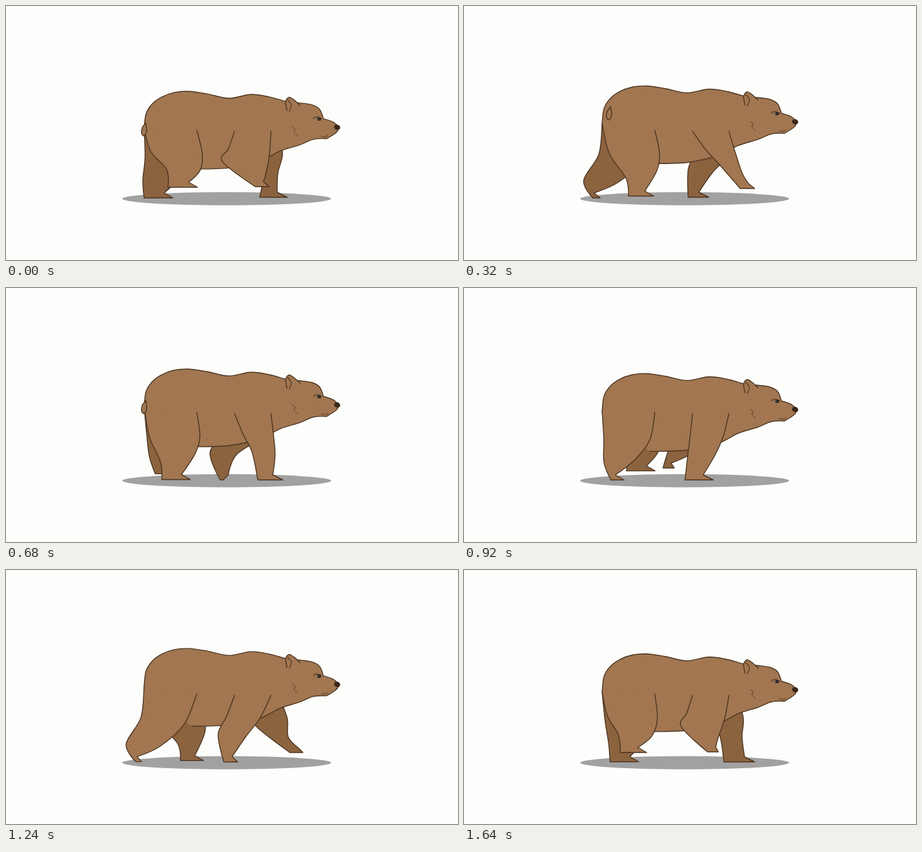
Animation, 720 px wide and 405 px high, one loop 1720 ms. Source, as an HTML page with a canvas:

```html
<!DOCTYPE html>
<html lang="en">
<head>
<meta charset="utf-8">
<title>Walking bear</title>
<style>
html, body { margin: 0; width: 100%; height: 100%; overflow: hidden; background: #fdfefc; }
canvas { display: block; width: 720px; height: 405px; }
</style>
</head>
<body>
<canvas id="stage" width="720" height="405"></canvas>
<script>
const ctx = document.getElementById('stage').getContext('2d');
const LOOP = 1720, STEP = 80, SHORT_STEP_END = 600, GROUND = 305;
const PAPER = '#fdfefc', SHADOW = '#a2a1a1', FUR = '#a17650', FAR_FUR = '#8b633f', INK = '#493320';

// Foot paths: time, heel x, foot y, visible foot length (fore legs: elbow x).
const HIND_STEP = [
  [0, 258, 289, 47], [320, 262, 303, 40], [400, 283, 304, 36], [540, 270, 305, 45], [860, 220, 306, 46],
  [920, 234, 306, 21], [1200, 203, 306, 11], [1400, 222, 304, 2], [1640, 249, 291, 42]
];
const FORE_STEP = [
  [0, 397, 288, 22, 345], [320, 440, 291, 23, 405], [480, 437, 304, 40, 405], [680, 401, 306, 40, 392],
  [920, 352, 306, 45, 357], [1240, 347, 306, 22, 338], [1400, 345, 304, 5, 338], [1640, 388, 290, 17, 346]
];
const FAR_FORE_STEP = [
  [0, 404, 305, 44, 410], [320, 357, 305, 33, 357], [680, 341, 306, 5, 325], [920, 317, 287, 18, 331],
  [1240, 452, 291, 21, 400], [1400, 456, 304, 33, 416], [1640, 414, 306, 49, 407]
];

// Torso outline at rest; the head is given as offsets from the nose.
const BACK = [[220,190], [223,166], [233,150], [248,139], [267,132], [290,130], [320,134], [355,141], [390,135], [420,139]];
const HEAD = [[-80,-41], [-60,-39], [-40,-36], [-28,-29], [-22,-14], [-4,-7], [1,5], [-17,18], [-38,19], [-60,28]];
const BELLY = [[437,225], [405,241], [355,252], [296,254]];
const NOSE = [527.5, 187.5];
const BROW = BACK.length + 4, CHIN = BACK.length + 7;
const TORSO = [...BACK, ...HEAD.map(([x, y]) => [x + NOSE[0], y + NOSE[1]]), ...BELLY];

const bob = time => 6.5 * Math.cos(4 * Math.PI * (time - 50) / LOOP);

function sample(keys, time) {
  const i = keys.findLastIndex(k => k[0] <= time);
  const a = keys[i], b = keys[(i + 1) % keys.length];
  const k = (time - a[0]) / ((b[0] - a[0] + LOOP) % LOOP);
  return a.slice(1).map((v, j) => v + (b[j + 1] - v) * k);
}

// Smooth curve through points; corners keep their sharp angle.
function curve(pts, corners = []) {
  const path = new Path2D();
  const slope = i => {
    if (corners.includes(i)) return [0, 0];
    const a = pts[Math.max(i - 1, 0)], b = pts[Math.min(i + 1, pts.length - 1)];
    return [(b[0] - a[0]) / 6, (b[1] - a[1]) / 6];
  };
  path.moveTo(...pts[0]);
  for (let i = 1; i < pts.length; i++) {
    const p = pts[i - 1], q = pts[i], u = slope(i - 1), v = slope(i);
    path.bezierCurveTo(p[0] + u[0], p[1] + u[1], q[0] - v[0], q[1] - v[1], ...q);
  }
  return path;
}

function shape(pts, fill, corners, width = 1.4) {
  const path = curve(pts, corners);
  if (fill) {
    ctx.fillStyle = fill;
    ctx.fill(path);
  }
  ctx.lineWidth = width;
  ctx.stroke(path);
}

function ellipse(x, y, rx, ry, color, angle = 0) {
  ctx.fillStyle = color;
  ctx.beginPath();
  ctx.ellipse(x, y, rx, ry, angle, 0, Math.PI * 2);
  ctx.fill();
}

// Legs run down the back edge, around the foot and up the front edge.
function drawHind(time, rise, fill) {
  const [heel, y, length] = sample(HIND_STEP, time);
  const toe = heel + length;
  const rump = [BACK[0][0], BACK[0][1] + rise];
  const hock = [heel - 2 - 17 * Math.max(0, 1 - length / 45), y - 28];
  const thigh = [(rump[0] + hock[0]) / 2 + (228 - hock[0]) / 4, (rump[1] + hock[1]) / 2 + 4];
  const knee = [0.72 * toe + 90, 268 - 0.22 * (toe - 275)];
  const flank = [304 + 0.45 * (knee[0] - 304) + 6, 200 + 0.57 * (knee[1] - 200)];
  const ankle = [Math.max(heel + 2, toe - 14), y - 8];
  shape([rump, thigh, hock, [heel, y], [toe, y], ankle, knee, flank, [304, 198]], fill, [3, 4, 5]);
}

function drawFore(keys, time, fill, shift = 0) {
  const [heel, y, length, elbowX] = sample(keys, time);
  const toe = heel + length;
  const shoulder = [364 + shift, 200];
  const elbow = [elbowX, 262 - 0.8 * Math.max(0, GROUND - y)];
  const upperArm = [(shoulder[0] + elbow[0]) / 2, (shoulder[1] + elbow[1]) / 2 + 3];
  const ankle = [Math.max(heel + 13, toe - 16), y - 8];
  const wrist = [0.65 * toe + 142, 266];
  const chest = [0.3 * toe + 294 + shift, 236];
  shape([shoulder, upperArm, elbow, [heel, y], [toe, y], ankle, wrist, chest, [422 + shift, 200]], fill, [3, 4, 5]);
}

function drawFace(rise) {
  ctx.save();
  ctx.translate(NOSE[0], NOSE[1] + rise);
  shape([[-80,-27], [-82,-41], [-77,-48], [-69,-44], [-59,-35]], FUR);
  shape([[-79,-44], [-73,-36], [-76,-26]], null, [], 1.2);
  shape([[-71,-1], [-67,3], [-69,8], [-63,14]], null, [1, 2], 0.9);
  shape([[-25,14], [-20,15], [-15,13]], null, [], 1);
  shape([[-38,-14], [-33,-17], [-25,-14]], null, [], 1.1);
  ellipse(-29, -13.5, 3.5, 2.8, '#302a26');
  ellipse(-31, -13.5, 0.8, 0.8, '#b9b0a4');
  ellipse(0, -0.3, 5, 4.2, '#392719', 0.4);
  ctx.restore();
}

function drawTail(time, rise) {
  const swing = Math.sin(Math.PI * time / 680);
  const x = 219 + 11 * swing, y = 192 - 17 * swing + rise;
  shape([[x + 4, y - 12], [x - 2, y - 4], [x - 3, y + 5], [x + 1, y + 9], [x + 5, y + 2], [x + 4, y - 10]], FUR);
}

function draw(time) {
  const rise = bob(time);
  ctx.fillStyle = PAPER;
  ctx.fillRect(0, 0, 720, 405);
  ellipse(351.5, 307.3, 166.5, 10.5, SHADOW);

  ctx.strokeStyle = INK;
  ctx.lineCap = ctx.lineJoin = 'round';
  drawHind((time + LOOP / 2) % LOOP, rise, FAR_FUR);
  drawFore(FAR_FORE_STEP, time, FAR_FUR, 12);
  shape(TORSO.map(([x, y]) => [x, y + rise]), FUR, [BROW, CHIN]);
  drawHind(time, rise, FUR);
  drawFore(FORE_STEP, time, FUR);
  if (time < 800) drawTail(time, rise);
  drawFace(rise);
}

function tick() {
  const t = performance.now() % LOOP;
  const base = t < SHORT_STEP_END ? 0 : SHORT_STEP_END;
  draw(base + Math.floor((t - base) / STEP) * STEP);
  requestAnimationFrame(tick);
}
tick();
</script>
</body>
</html>
```
